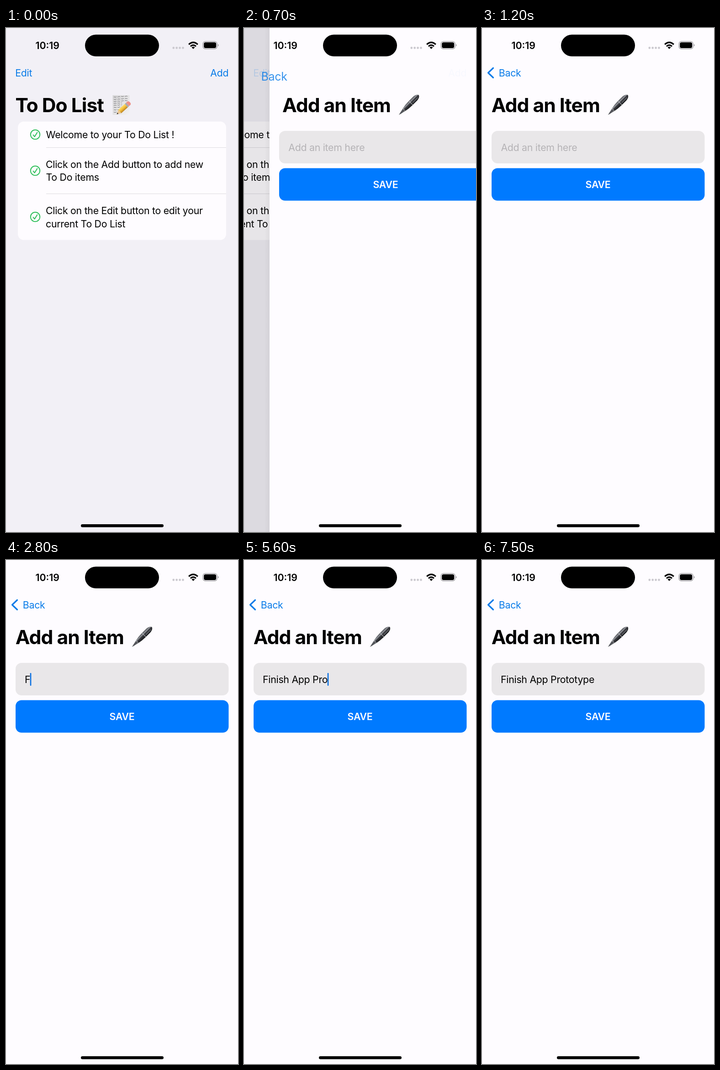
An HTML page that plays this animation: 508x1102 px, repeating every 8 s.

```html
<!DOCTYPE html>
<html lang="en">
<head>
<meta charset="utf-8">
<title>To Do List</title>
<style>
  html, body { margin: 0; width: 100%; height: 100%; overflow: hidden; background: #fefcff; }
  svg { display: block; width: 508px; height: 1102px; }
  text {
    font: 400 21.3px Inter, "Liberation Sans", sans-serif;
    font-optical-sizing: none;
    letter-spacing: -.27px;
    white-space: pre;
  }
  .title { font-size: 42.6px; font-weight: 700; letter-spacing: -1px; }
  .bold { font-weight: 600; }
  .link { fill: #087be8; }
  .tick { fill: none; stroke: #34c05e; stroke-width: 2; stroke-linecap: round; stroke-linejoin: round; }
</style>
</head>
<body>
<svg viewBox="0 0 508 1102">
  <defs>
    <linearGradient id="paper" x1="0" y1="0" x2="1" y2="1">
      <stop stop-color="#d5d4d5"/><stop offset="1" stop-color="#f3f2f3"/>
    </linearGradient>
    <linearGradient id="wood" x1="0" y1="0" x2="0" y2="1">
      <stop stop-color="#ffdf6b"/><stop offset=".5" stop-color="#f3bd3b"/><stop offset="1" stop-color="#b9801e"/>
    </linearGradient>
    <linearGradient id="ink" x1="0" y1="0" x2="0" y2="1">
      <stop stop-color="#44464b"/><stop offset=".28" stop-color="#9a9ca2"/>
      <stop offset=".45" stop-color="#3b3c41"/><stop offset="1" stop-color="#17181b"/>
    </linearGradient>
    <linearGradient id="shade">
      <stop stop-opacity="0"/><stop offset="1" stop-opacity=".04"/>
    </linearGradient>
    <g id="tick">
      <circle class="tick" r="10.2"/>
      <path class="tick" d="M-4.4 .8L-1.4 4.6L4.4 -4.6"/>
    </g>
  </defs>

  <g id="list">
    <rect width="700" height="1102" fill="#f2f0f6"/>
    <rect x="26" y="204.5" width="456" height="259" rx="13" fill="#fefcff"/>
    <path d="M88 261.5H482M88 362.5H482" stroke="#dcdadf"/>
    <use href="#tick" x="64" y="233"/>
    <use href="#tick" x="64" y="312"/>
    <use href="#tick" x="64" y="413"/>
    <text x="87.5" y="240.8">Welcome to your To Do List !</text>
    <text x="87" y="305.8">Click on the Add button to add new</text>
    <text x="87.5" y="334.3">To Do items</text>
    <text x="87" y="407">Click on the Edit button to edit your</text>
    <text x="87" y="435.5">current To Do List</text>
  </g>
  <rect id="dim" width="508" height="1102"/>

  <g id="form">
    <rect x="-11" width="11" height="1102" fill="url(#shade)"/>
    <rect width="508" height="1102" fill="#fefcff"/>
    <rect x="21" y="225" width="466.5" height="71" rx="13" fill="#e9e7e9"/>
    <rect x="21" y="306.5" width="466.5" height="71" rx="13" fill="#007aff"/>
    <text id="hint" x="41.4" y="269" fill="#b5b3b6">Add an item here</text>
    <text id="entry" x="41" y="269"></text>
    <rect id="caret" y="247" width="2.6" height="28" rx="1.2" fill="#0a70e0"/>
    <text class="bold" x="254" y="350" text-anchor="middle" fill="#fefcff">SAVE</text>
  </g>

  <g id="listTitle">
    <text class="title" x="20.5" y="184.3">To Do List</text>
    <rect x="233.5" y="147" width="37" height="43" fill="url(#paper)"/>
    <path id="scrawl" fill="none" stroke="#66656a" stroke-width=".9"/>
    <g transform="translate(242.5 188.5) rotate(-42)">
      <path d="M0 0L9 -5V5Z" fill="#ecc795"/>
      <path d="M0 0L3.4 -1.9V1.9Z" fill="#37352f"/>
      <rect x="9" y="-5" width="19" height="10" fill="url(#wood)"/>
      <rect x="28" y="-5" width="4" height="10" fill="#a9abad"/>
      <path d="M32 -5H35Q39 -5 39 0T35 5H32Z" fill="#ee9188"/>
    </g>
  </g>
  <g id="formTitle">
    <text class="title" x="20.8" y="184.3">Add an Item</text>
    <g transform="translate(276 190) rotate(-45)">
      <path d="M0 0L5 -1.3L16 -3.6V3.6L5 1.3Z" fill="#55575c"/>
      <path d="M15 -3.7Q25 -6 36 -6H51Q60 -5 61.5 0Q60 5 51 6H36Q25 6 15 3.7Z" fill="url(#ink)"/>
      <path d="M16 -3.6V3.6M37 -6V6" stroke="#c2c3c7" stroke-width="1"/>
      <path d="M40 2.5H56" stroke="#75777c" stroke-width="1.4"/>
    </g>
  </g>
  <text id="edit" class="link" x="20.3" y="105.8">Edit</text>
  <text id="add" class="link" x="487.3" y="105.8" text-anchor="end">Add</text>
  <path id="arrow" d="M24.5 87.5L13.5 98L24.5 108.5" fill="none" stroke="#087be8" stroke-width="3.2" stroke-linecap="round" stroke-linejoin="round"/>
  <g id="back"><text class="link" x="36.8" y="105.8">Back</text></g>

  <text class="bold" x="64.5" y="45.7" style="letter-spacing:0">10:19</text>
  <rect x="173" y="14.5" width="162" height="47.5" rx="23.75"/>
  <path d="M366.8 43.5h.01M373.7 43.5h.01M380.6 43.5h.01M387.5 43.5h.01" stroke="#cbc9cf" stroke-width="4.8" stroke-linecap="round"/>
  <g fill="none" stroke="#000" stroke-width="3.2">
    <path d="M400.2 36Q410 27 419.8 36"/>
    <path d="M404 40.2Q410 34.6 416 40.2"/>
  </g>
  <path d="M406.4 42.2Q410 39.2 413.6 42.2L410 46Z"/>
  <rect x="431.2" y="29.3" width="31" height="16.6" rx="5.4" fill="none" stroke="#98969b" stroke-width="1.3"/>
  <rect x="433.2" y="31.2" width="27" height="12.8" rx="3.7"/>
  <path d="M464 35Q467.5 37.6 464 40.4Z" fill="#98969b"/>
  <rect x="164" y="1085" width="181" height="6.5" rx="3.25"/>
</svg>
<script>
const LOOP = 8000, STEP = 100, WIDTH = 508;
const PUSH = 500, SETTLED = 1000, FOCUS = 2300, CARET_OFF = 7500;
const PHRASE = 'Finish App Prototype';
// When each character of PHRASE is typed.
const KEYS = [2800, 3000, 3200, 3400, 3600, 3700, 4000, 4400, 4500, 4700, 4900,
  5300, 5400, 5600, 6000, 6200, 6600, 6700, 6800, 7100];

const $ = id => document.getElementById(id);
const clamp = v => Math.min(1, Math.max(0, v));
const move = (id, value) => $(id).setAttribute('transform', value);
const fade = (id, value) => $(id).setAttribute('opacity', clamp(value));

// Handwriting on the memo sheet.
let scrawl = '';
for (let row = 0; row < 8; row++) {
  scrawl += `M236 ${151 + row * 4.7}`;
  for (let i = 0; i < (row < 3 ? 15 : 9); i++) {
    scrawl += (i % 4 === 3 ? 'm' : 'l') + `2 ${Math.sin(i * 2.4 + row) * 1.1 - .15}`;
  }
}
$('scrawl').setAttribute('d', scrawl);

// Critically damped spring: share of the push still to go.
function remaining(t) {
  if (t < PUSH) return 1;
  if (t >= SETTLED) return 0;
  const u = .01875 * (t - PUSH + 1);
  return (1 + u) * Math.exp(-u);
}

function drawPush(t) {
  const r = remaining(t), p = 1 - r, edge = WIDTH * r;
  move('list', `translate(${-.3 * WIDTH * p} 0)`);
  fade('dim', .1 * p);
  move('form', `translate(${edge} 0)`);
  fade('form', t < PUSH ? 0 : 1);
  move('formTitle', `translate(${1.13 * edge} 0)`);
  move('listTitle', `translate(${22 + 26.5 * p} ${169 - 64 * p}) scale(${1 - .52 * p}) translate(-22 -169)`);
  fade('listTitle', 1 - 1.36 * p);
  move('back', `translate(${38 + 9 * r} ${98 + 73 * r}) scale(${1 + 1.55 * r}) translate(-38 -98)`);
  fade('back', (p - .565) / .4);
  fade('arrow', (p - .9) / .1);
  fade('edit', 1 - p ** 1.7);
  fade('add', t < PUSH ? 1 : .2 * r);
}

function drawEntry(t) {
  const entry = $('entry');
  const typed = PHRASE.slice(0, KEYS.filter(k => k <= t).length);
  entry.textContent = typed;
  fade('hint', typed ? 0 : 1);
  const x = 40.4 + (typed ? entry.getComputedTextLength() : 0);
  $('caret').setAttribute('x', x);
  fade('caret', t >= FOCUS && t < CARET_OFF ? 1 : 0);
}

const start = performance.now();
let last = -1;
function tick() {
  const t = Math.floor((performance.now() - start) % LOOP / STEP) * STEP;
  if (t !== last) {
    drawPush(t);
    drawEntry(t);
    last = t;
  }
  requestAnimationFrame(tick);
}
tick();
</script>
</body>
</html>
```
